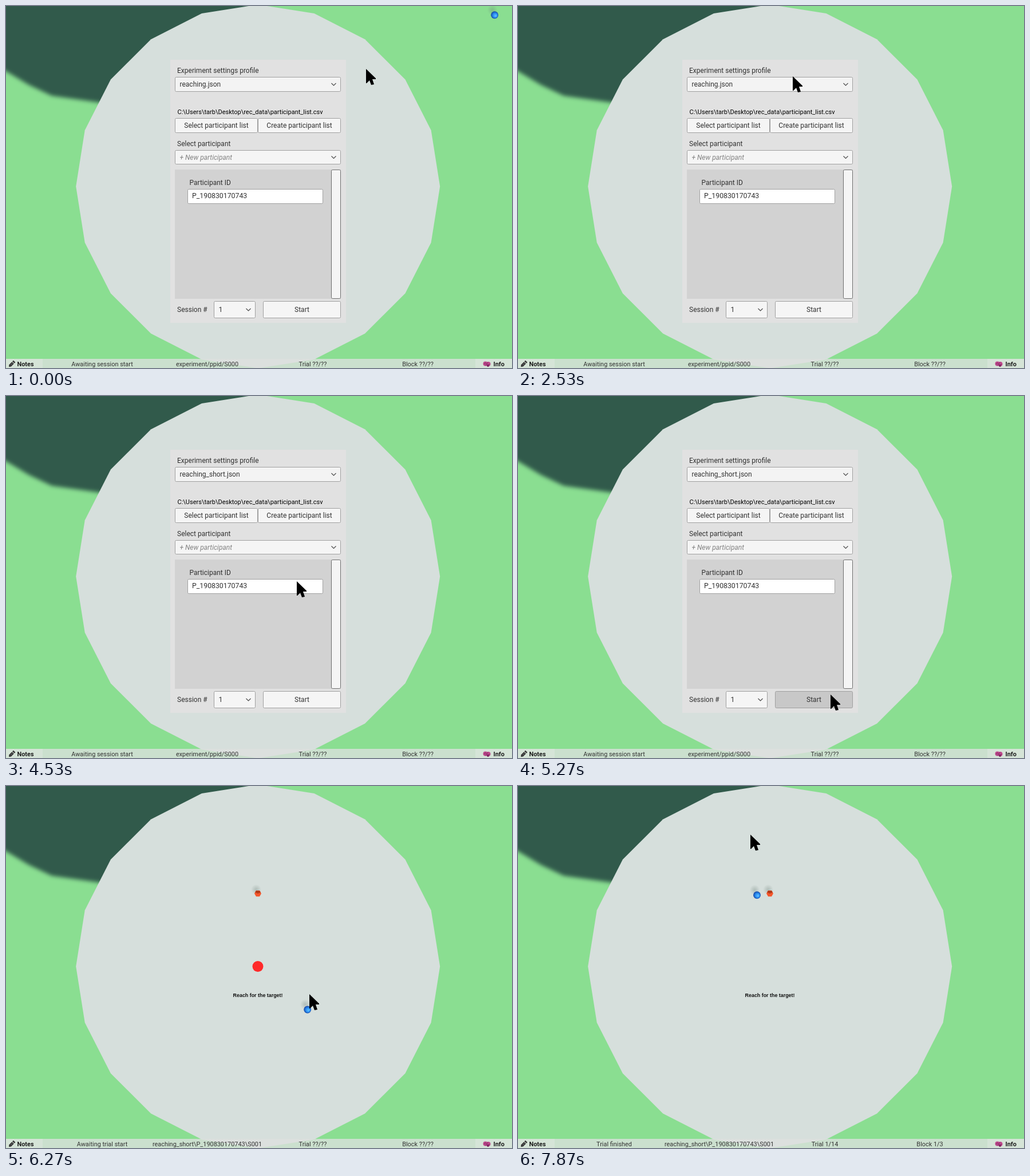
These frames come from a looping animation (884x633 px, 8000 ms). An HTML page with a canvas:

```html
<!DOCTYPE html>
<html lang="en">
<head>
<meta charset="utf-8">
<title>Reaching task</title>
<style>
  html, body { margin: 0; width: 100%; height: 100%; overflow: hidden; background: #8ade91; }
  canvas { display: block; }
</style>
</head>
<body>
<canvas id="stage" width="884" height="633"></canvas>
<script>
const W = 884, H = 633, LOOP = 8000, STEP = 1000 / 15;
const ctx = document.getElementById('stage').getContext('2d');
const INK = '#323232';

// Moments of the session, in ms
const OPEN = 3270, PICK = 4200, PRESS = 5200, START = 5330;
const READY = 6930, GO = 7400, LEFT = 7730, HIT = 7870;

const clamp = v => Math.max(0, Math.min(1, v));
const ramp = (t, from, length) => clamp((t - from) / length);
const linear = p => p;
const easeIn = p => p * p;
const easeOut = p => 1 - (1 - p) ** 4;
const easeInOut = p => p * p * (3 - 2 * p);

// Pointer strokes: begin, end, destination, easing
const ENTRY = [916, -22];
const STROKES = [
  [-70, 130, 575, 137, easeOut],
  [200, 1300, 509, 515, easeInOut],
  [1870, 2330, 490, 108, easeInOut],
  [2330, 2530, 480, 125, easeInOut],
  [2670, 2730, 466, 108, linear],
  [2930, 3730, 478, 161, easeInOut],
  [3800, 4000, 472, 175, linear],
  [4130, 5000, 552, 510, easeInOut],
  [5000, 5200, 546, 524, linear],
  [5530, 6570, 524, 302, linear],
  [6570, 7000, 445, 306, easeInOut],
  [7600, 7870, 406, 87, easeIn]
];

function pointer(t) {
  let [x, y] = ENTRY;
  for (const [begin, end, tx, ty, ease] of STROKES) {
    const p = ease(ramp(t, begin, end - begin));
    x += (tx - x) * p;
    y += (ty - y) * p;
  }
  return [x, y];
}

function poly(c, pts, fill) {
  c.beginPath();
  pts.forEach(([x, y]) => c.lineTo(x, y));
  c.closePath();
  c.fillStyle = fill;
  c.fill();
}

function ring(sides, x, y, r) {
  return Array.from({ length: sides }, (_, i) => {
    const a = i * 2 * Math.PI / sides;
    return [x + r * Math.cos(a), y + r * Math.sin(a)];
  });
}

function disc(x, y, r, fill) {
  ctx.beginPath();
  ctx.arc(x, y, r, 0, 2 * Math.PI);
  ctx.fillStyle = fill;
  ctx.fill();
}

function rect(x, y, w, h, fill) {
  ctx.fillStyle = fill;
  ctx.fillRect(x, y, w, h);
}

function line(pts, color, width) {
  ctx.beginPath();
  pts.forEach(([x, y]) => ctx.lineTo(x, y));
  ctx.strokeStyle = color;
  ctx.lineWidth = width;
  ctx.stroke();
}

function text(s, x, y, { size = 12, style = '', align = 'left', color = INK, family = 'Roboto' } = {}) {
  ctx.font = `${style} ${size}px ${family}, sans-serif`;
  ctx.textAlign = align;
  ctx.fillStyle = color;
  ctx.fillText(s, x, y);
}

function box(x, y, w, h, fill = '#f5f5f5', border = '#a0a0a0') {
  ctx.beginPath();
  ctx.roundRect(x + .5, y + .5, w - 1, h - 1, 2);
  ctx.fillStyle = fill;
  ctx.fill();
  ctx.strokeStyle = border;
  ctx.lineWidth = 1;
  ctx.stroke();
}

const chevron = (x, y) => line([[x - 4, y - 2], [x, y + 2], [x + 4, y - 2]], '#484848', 1.1);

function button(label, x, y, w, h, fill) {
  box(x, y, w, h, fill);
  text(label, x + w / 2, y + h / 2 + 4, { align: 'center' });
}

function dropdown(label, x, y, w, h, { fill, ...font } = {}) {
  box(x, y, w, h, fill);
  text(label, x + 8.5, y + Math.round(h / 2) + 4, font);
  chevron(x + w - 12.5, y + h / 2);
}

// Ground, blurred shade and the twenty-sided table
const scene = document.createElement('canvas');
scene.width = W;
scene.height = H;
{
  const c = scene.getContext('2d');
  c.fillStyle = '#8ade91';
  c.fillRect(0, 0, W, H);
  c.filter = 'blur(3.5px)';
  poly(c, [[-30, -30], [424, -30], [424, 60], [300, 190], [165, 169], [80, 157],
    [40, 138], [0, 114], [-30, 96]], '#315a4b');
  c.filter = 'none';
  poly(c, ring(20, 440.2, 315.5, 318), '#d6dfdc');
}

function shade(x, y) {
  const g = ctx.createRadialGradient(x, y, 1, x, y, 9);
  g.addColorStop(0, 'rgba(110,130,122,.32)');
  g.addColorStop(1, 'rgba(110,130,122,0)');
  disc(x, y, 9, g);
}

function goal() {
  shade(437, 181);
  poly(ctx, ring(6, 440, 188, 6), '#f4562b');
  poly(ctx, [[437, 183], [443, 183], [445, 186], [440, 188], [435, 186]], '#b03a18');
}

function ball(x, y) {
  shade(x - 4, y - 9);
  const g = ctx.createRadialGradient(x + 2, y + 1.5, .5, x, y, 6.8);
  g.addColorStop(0, '#5cc0ff');
  g.addColorStop(.5, '#2b8df2');
  g.addColorStop(1, '#123f9c');
  disc(x, y, 6.5, g);
}

function task(t) {
  goal();
  if (t < LEFT) disc(440, 315.5, 9.5, t < READY ? '#ff2a2a' : t < GO ? '#ff902a' : '#2aff2a');
  text('Reach for the target!', 440, 369,
    { size: 8.9, style: 'bold', align: 'center', color: '#111', family: 'Liberation Sans' });
}

function options(alpha) {
  ctx.save();
  ctx.globalAlpha = alpha;
  box(295, 149, 290, 39);
  rect(296, 151, 288, 17, '#eaeaea');
  line([[299.5, 160], [302.5, 163], [308.5, 156]], '#484848', 1.1);
  text('reaching.json', 312, 164);
  text('reaching_short.json', 312, 181);
  ctx.restore();
}

function panel(t) {
  const shown = ramp(t, OPEN - 67, 150) - ramp(t, PICK - 67, 150);
  const press = ramp(t, PRESS - 40, 100);

  rect(287, 94, 307, 460, '#e1e1e1');
  text('Experiment settings profile', 299, 117);
  dropdown(t < PICK ? 'reaching.json' : 'reaching_short.json', 295, 124, 290, 26,
    { fill: shown > 0 ? '#ebebeb' : '#f3f3f3' });

  text('C:\\Users\\tarb\\Desktop\\rec_data\\participant_list.csv', 299.5, 189, { size: 11, color: '#000' });
  button('Select participant list', 295, 196, 145, 26);
  button('Create participant list', 440, 196, 145, 26);

  text('Select participant', 299, 245);
  dropdown('+ New participant', 295, 252, 290, 25, { style: 'italic', color: '#828282' });

  rect(295, 286, 290, 226, '#d2d2d2');
  box(568, 286, 17, 226, '#f5f5f5', '#6e6e6e');
  text('Participant ID', 320.5, 313);
  box(317, 320, 237, 26, '#fff');
  text('P_190830170743', 325, 336, { size: 12.3 });

  text('Session #', 299, 535);
  dropdown('1', 363, 516, 73, 30, { size: 12.3 });
  const grey = 245 - 45 * press;
  button('Start', 449, 516, 136, 30, `rgb(${grey},${grey},${grey})`);
  if (shown > 0) options(shown);
}

function pencil(x, y) {
  ctx.save();
  ctx.translate(x, y);
  ctx.rotate(-Math.PI / 4);
  poly(ctx, [[-7, 0], [-4, -2.4], [3, -2.4], [3, 2.4], [-4, 2.4]], '#333');
  rect(4, -2.4, 2.6, 4.8, '#333');
  line([[-3, 0], [2, 0]], '#999', .7);
  ctx.restore();
}

function brain(x, y) {
  const pink = '#bd4a8c', fold = '#7f2460';
  disc(x - 2.5, y - .5, 4, pink);
  disc(x + 2.5, y, 4, pink);
  disc(x + 2, y + 3, 2, fold);
  line([[x - 5, y], [x - 2, y - 2], [x, y], [x + 2, y - 3]], fold, .9);
  line([[x - 3, y + 2], [x, y + 1.5], [x + 5, y + 1]], fold, .9);
}

function statusBar(t) {
  rect(0, 617, W, 16, 'rgba(222,225,223,.78)');
  for (const x of [0, W - 64]) rect(x, 617, 64, 16, 'rgba(235,235,235,.3)');

  const state = t < START ? 'Awaiting session start' : t < GO ? 'Awaiting trial start'
    : t < HIT ? 'Trial in progress' : 'Trial finished';
  const session = t < START ? 'experiment/ppid/S000' : 'reaching_short\\P_190830170743\\S001';
  const mid = { size: 10.9, align: 'center' };
  text(state, 168, 630, mid);
  text(session, 351.5, 630, mid);
  text(`Trial ${t < GO ? '??/??' : '1/14'}`, 536, 630, mid);
  text(`Block ${t < GO ? '??/??' : '1/3'}`, 719.5, 630, mid);

  const bold = { size: 10.9, style: 'bold', color: '#1c1c1c' };
  text('Notes', 19.5, 630, bold);
  text('Info', 851.5, 630, bold);
  pencil(10, 626);
  brain(840, 626);
}

function arrow(x, y) {
  ctx.save();
  ctx.translate(Math.round(x), Math.round(y) - 2);
  poly(ctx, [[0, 0], [17, 16.5], [17, 18], [11, 18], [14, 27], [9, 28], [6, 20], [1, 25], [0, 25]], '#000');
  ctx.restore();
}

function draw(t) {
  ctx.drawImage(scene, 0, 0);
  if (t >= START) task(t);
  const [bx, by] = pointer(t - 65);
  ball(bx - 5, by + 11);
  if (t < START) panel(t);
  statusBar(t);
  arrow(...pointer(t));
}

function tick() {
  const step = Math.floor((performance.now() % LOOP + 4) / STEP);
  draw(Math.min(HIT, Math.floor(step * STEP + 4)));
  requestAnimationFrame(tick);
}
tick();
</script>
</body>
</html>
```
